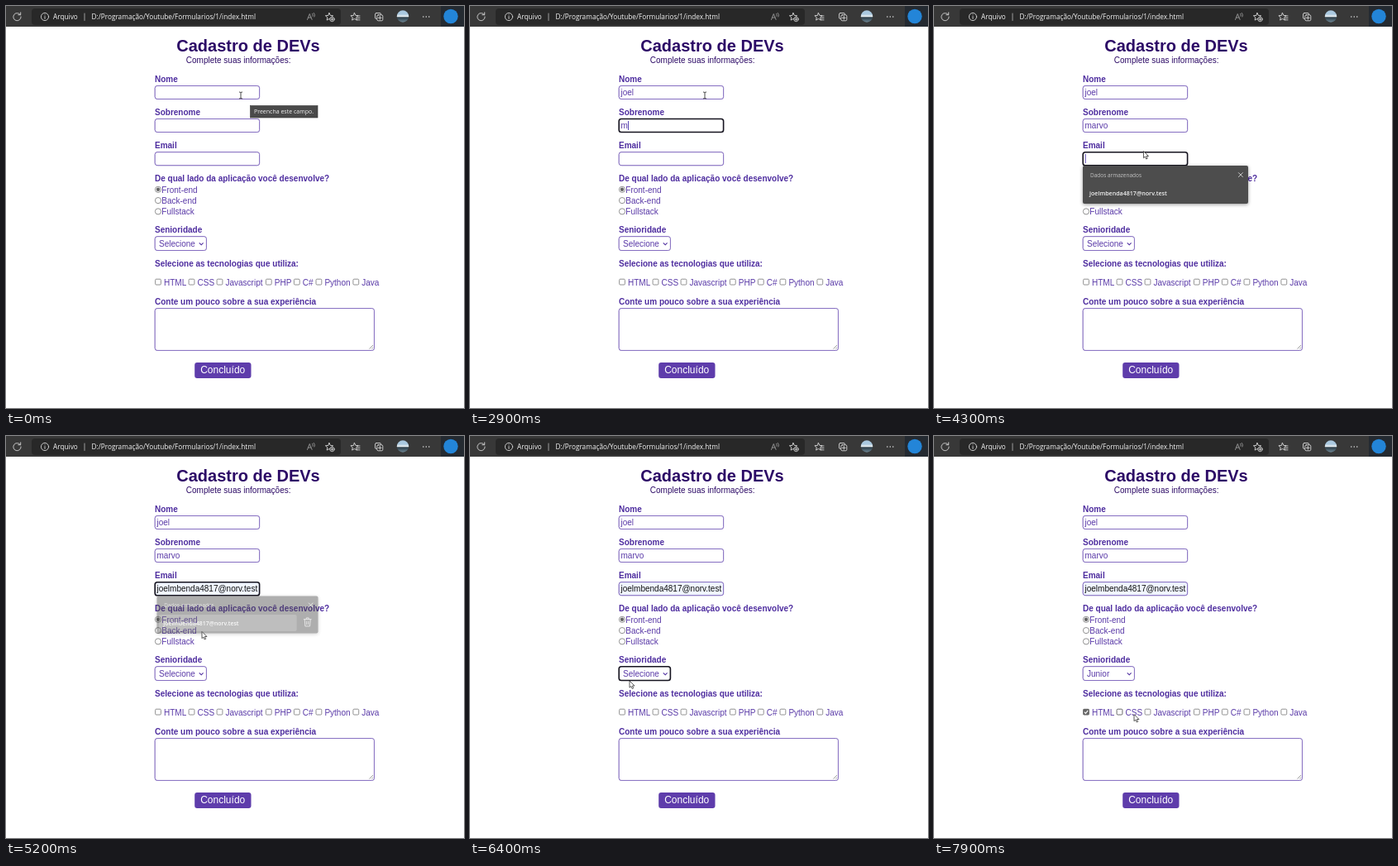
Animation of 554 by 486 pixels, one loop 8000 ms. Source, as an HTML page:

```html
<!DOCTYPE html>
<html lang="pt">
<head>
<meta charset="utf-8">
<title>Cadastro de DEVs</title>
<style>
html, body { margin: 0; width: 100%; height: 100%; overflow: hidden; background: #fff; }
svg { display: block; width: 554px; height: 486px; }
text { font: 10px "Liberation Sans", Arial, sans-serif; fill: #5a3aa8; white-space: pre; }
.ui text { font: 8.25px "Open Sans", sans-serif; fill: #f2f2f2; }
.label { font-weight: bold; fill: #4e2d9f; }
.dark { fill: #2c0a66; }
.box { fill: #fff; stroke: #7d65bd; stroke-width: .9; filter: drop-shadow(.5px .7px .3px #6a4fb0aa); }
.box.focus { stroke: #15131f; stroke-width: 1.6; filter: none; }
.box.filled { fill: #f0f5ff; }
.tick { fill: #fff; stroke: #777; stroke-width: .8; }
.icon { fill: none; stroke: #d6d6d6; stroke-width: .9; stroke-linecap: round; stroke-linejoin: round; }
</style>
</head>
<body>
<svg viewBox="0 0 554 486">
  <defs>
    <clipPath id="inner"><rect x="182" y="170" width="122.6" height="30"/></clipPath>
    <linearGradient id="photo" x2="0" y2="1">
      <stop offset=".3" stop-color="#a9c8df"/><stop offset=".5" stop-color="#e4ebee"/>
      <stop offset=".6" stop-color="#2c3d49"/><stop offset="1" stop-color="#6f8794"/>
    </linearGradient>
    <path id="star" d="M0-4.6 1.4-1.6 4.6-1.3 2.2.9 2.9 4.1 0 2.5-2.9 4.1-2.2.9-4.6-1.3-1.4-1.6z"/>
  </defs>

  <g class="ui">
    <rect width="554" height="25" fill="#383838"/>
    <rect x="31" y="3" width="374" height="20" rx="4" fill="#282828"/>
    <g class="icon">
      <path d="M17.2 10.4A4.6 4.6 0 1 0 18.1 13M17.7 7.8V10.7H14.8"/>
      <circle cx="47" cy="13" r="4.6"/><path d="M47 12.6V15.4M47 10.7V10.8"/>
      <path d="M95 9V17.5" stroke="#aaa"/>
      <path d="M364.5 16.5 367.3 9.5 370.1 16.5M365.5 14H369M370.6 9.3Q372 10.7 371 12.3M372.2 8.3Q374.6 10.5 373 13" stroke="#999"/>
      <use href="#star" x="391" y="13"/><circle cx="394.5" cy="16" r="2.7" fill="#282828"/><path d="M393.2 16H395.8M394.5 14.7V17.3"/>
      <use href="#star" x="421.5" y="13"/><path d="M424.5 12H428M425 14.4H428M424.5 16.8H428"/>
      <rect x="446.5" y="8.5" width="7" height="7" rx="1.5"/><rect x="448.8" y="10.8" width="7" height="7" rx="1.5" fill="#383838"/>
      <path d="M450.4 14.3H454.2M452.3 12.4V16.2"/>
      <path d="M504.7 13h.1M508.2 13h.1M511.7 13h.1" stroke-width="1.5"/>
    </g>
    <circle cx="480" cy="12.5" r="7.2" fill="url(#photo)"/>
    <rect x="526" width="28" height="25" fill="#242a31"/>
    <circle cx="538" cy="12.5" r="8.7" fill="#2385d8"/>
    <text x="57" y="16">Arquivo</text>
    <text x="103.5" y="16">D:/Programação/Youtube/Formularios/1/index.html</text>
  </g>

  <text class="dark" x="206.3" y="55" style="font-size:20px;font-weight:bold">Cadastro de DEVs</text>
  <text class="dark" x="217.8" y="68.8">Complete suas informações:</text>
  <g id="form"></g>
  <circle cx="184" cy="221.8" r="2.2" fill="#666"/>
  <path d="M233.8 286.3 236.2 288.8 238.6 286.3" fill="none" stroke="#4e2d9f" stroke-width="1.1"/>
  <path d="M439.5 414.5 444 410M442.2 414.5 444 412.7" stroke="#777" stroke-width=".7"/>
  <g id="checked"><rect x="180.3" y="329.9" width="7.4" height="7.4" rx="1.2" fill="#666"/>
    <path d="M181.9 333.7 183.4 335.3 186.2 331.8" fill="none" stroke="#fff" stroke-width="1.1"/></g>
  <rect x="228.2" y="431" width="68.3" height="19" rx="3" fill="#5e3cab"/>
  <text x="235.2" y="444.4" style="font-size:12px;fill:#fff">Concluído</text>

  <text id="name" x="182.5" y="108"/>
  <text id="surname" x="182.5" y="148"/>
  <text id="mail" x="182.5" y="188" clip-path="url(#inner)" style="fill:#111">joelmbenda4817@norv.test</text>
  <text id="level" x="185" y="290.8"/>
  <rect id="caret" width=".9" height="11" fill="#4a35b0"/>

  <g id="tip" class="ui">
    <rect x="295.5" y="120.5" width="81.5" height="14.5" fill="#4a4a4a" stroke="#333" stroke-width=".6"/>
    <text x="300" y="130.3" style="font-size:7px">Preencha este campo.</text>
  </g>

  <g id="popup" class="ui">
    <rect x="180" y="193" width="200" height="46" rx="2" fill="#4d4d4d" style="filter:drop-shadow(0 1px 2px #0006)"/>
    <text x="189" y="206.6" style="font-size:6.47px;fill:#c4c4c4">Dados armazenados</text>
    <path class="icon" d="M368.4 201.6 373.4 206.6M373.4 201.6 368.4 206.6"/>
    <g id="hover">
      <rect x="182.5" y="216" width="171" height="20.5" rx="2" fill="#707070"/>
      <path class="icon" d="M362.4 221.8H371.4M365.4 221.5V220H368.4V221.5M363.3 222 364 230.3H369.8L370.5 222M365.8 224.3V228M368 224.3V228"/>
    </g>
    <text x="188" y="229" style="font-size:7.1px;font-weight:600">joelmbenda4817@norv.test</text>
  </g>

  <path id="beam" d="M-2-4Q0-4 0-3V3Q0 4-2 4M2-4Q0-4 0-3M0 3Q0 4 2 4" fill="none" stroke="#333" stroke-width=".9"/>
  <path id="arrow" d="M0 0V8.2L1.9 6.5 3.2 9.5 4.7 8.8 3.4 6H6z" fill="#fff" stroke="#333" stroke-width=".8"/>
</svg>

<script>
const $ = id => document.getElementById(id);
const form = $('form');

function add(tag, attrs, text = '') {
  const el = document.createElementNS('http://www.w3.org/2000/svg', tag);
  for (const key in attrs) el.setAttribute(key, attrs[key]);
  el.textContent = text;
  return form.appendChild(el);
}
const label = (text, y) => add('text', { class: 'label', x: 180, y }, text);
const box = (y, width, height) => add('rect', { class: 'box', x: 180.2, y, width, height, rx: 2.8 });

label('Nome', 91.6);
label('Sobrenome', 131.6);
label('Email', 171.6);
label('De qual lado da aplicação você desenvolve?', 211.8);
label('Senioridade', 274.2);
label('Selecione as tecnologias que utiliza:', 314.6);
label('Conte um pouco sobre a sua experiência', 360.7);

const fields = [96.5, 136.5, 176.7].map(y => box(y, 126.4, 16));
fields.push(box(278.7, 62.2, 16.8));
box(365.6, 265.2, 50.8);

['Front-end', 'Back-end', 'Fullstack'].forEach((text, i) => {
  const y = 221.8 + i * 13.3;
  add('circle', { class: 'tick', cx: 184, cy: y, r: 3.6 });
  add('text', { x: 188.3, y: y + 3.7 }, text);
});

const skills = { HTML: 191, CSS: 231.5, Javascript: 265.5, PHP: 324.8, 'C#': 358.8, Python: 385.4, Java: 430.3 };
const ticks = Object.entries(skills).map(([text, x]) => {
  add('text', { x, y: 337.6 }, text);
  return add('rect', { class: 'tick', x: x - 10.4, y: 330.2, width: 6.8, height: 6.8, rx: 1.2 });
});

// Times in ms at which each letter appears, and at which focus moves on
const nameKeys = [800, 1000, 1300, 1800];
const surnameKeys = [2900, 3000, 3200, 3500, 3800];
const focusTimes = [400, 2400, 4200, 6100, 7300];

// Pointer path: time, x, y
const path = [
  [4000, 284, 108], [4200, 257, 168], [4300, 253.5, 175.5], [4500, 248, 206], [4800, 238, 230],
  [5100, 238, 230], [5200, 237, 236.5], [5900, 191, 273], [6000, 190, 283], [6300, 190, 284],
  [6500, 196, 308], [6800, 207, 319.5], [7000, 196, 328], [7200, 183.5, 332], [7500, 183.5, 332],
  [7800, 226, 333], [7900, 242, 336.5]
];

function pointerAt(t) {
  const next = path.findIndex(p => p[0] > t);
  if (next === 0) return path[0].slice(1);
  if (next < 0) return path.at(-1).slice(1);
  const [a, b] = [path[next - 1], path[next]];
  const k = (t - a[0]) / (b[0] - a[0]);
  return [a[1] + (b[1] - a[1]) * k, a[2] + (b[2] - a[2]) * k];
}

const typed = (text, keys, t) => text.slice(0, keys.filter(k => k <= t).length);
const show = (id, on) => $(id).style.display = on ? '' : 'none';

function draw(t) {
  const focus = focusTimes.filter(f => f <= t).length - 1;
  fields.forEach((f, i) => f.classList.toggle('focus', i === focus));
  fields[2].classList.toggle('filled', t >= 4600);

  $('name').textContent = typed('joel', nameKeys, t);
  $('surname').textContent = typed('marvo', surnameKeys, t);
  $('level').textContent = t < 6500 ? 'Selecione' : 'Junior';
  show('mail', t >= 4600);

  const active = [$('name'), $('surname')][focus];
  show('caret', active || focus === 2 && t < 4600);
  $('caret').setAttribute('x', 182.7 + (active ? active.getComputedTextLength() : 0));
  $('caret').setAttribute('y', 99 + 40 * Math.max(focus, 0));

  show('tip', t < 400);
  show('checked', t >= 7300);
  ticks[1].style.stroke = t >= 7900 ? '#444' : '';

  const closing = t >= 5200;
  show('popup', t >= 4300 && t < 5300);
  show('hover', t >= 4600);
  $('popup').setAttribute('opacity', closing ? .45 : 1);
  $('popup').setAttribute('transform', closing ? 'translate(280 216) scale(.975) translate(-280 -216)' : '');

  const [x, y] = pointerAt(t);
  const pointer = t < 4200 ? 'beam' : 'arrow';
  show('beam', pointer === 'beam');
  show('arrow', pointer === 'arrow');
  $(pointer).setAttribute('transform', `translate(${x} ${y})`);
}

const start = performance.now();
function tick() {
  draw(Math.floor((performance.now() - start) % 8000 / 100) * 100);
  requestAnimationFrame(tick);
}
tick();
</script>
</body>
</html>
```
